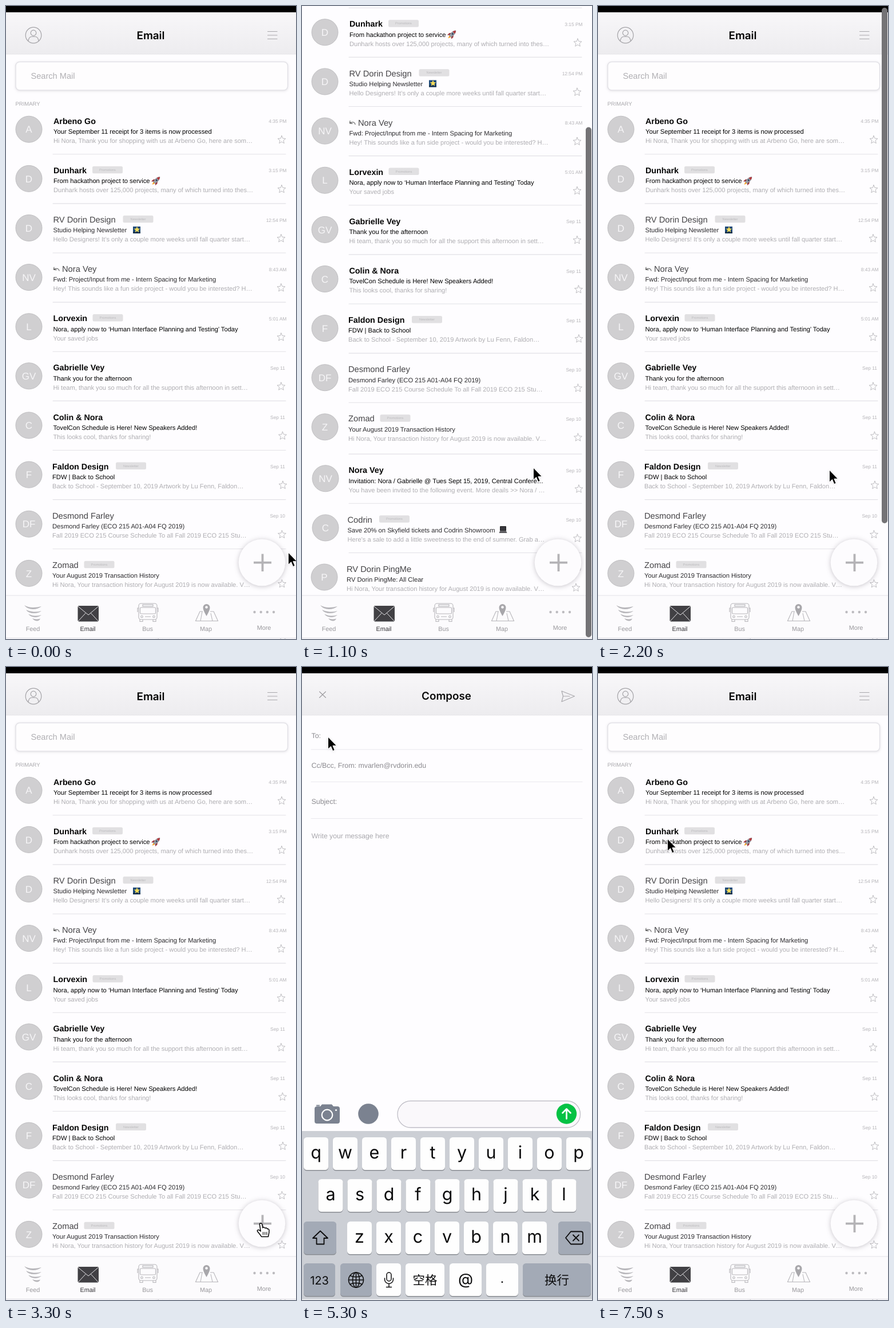
Recreate the animation shown at these times as an HTML page. Size 507 by 1105 pixels, loop 7.6 s.

```html
<!DOCTYPE html>
<html lang="en">
<head>
<meta charset="utf-8">
<title>Mail app prototype</title>
<style>
html, body { margin: 0; width: 100%; height: 100%; overflow: hidden; background: #fdfcfe; }
#stage { display: block; width: 100vw; height: 100vh; font-family: "Liberation Sans", Arial, sans-serif; text-rendering: geometricPrecision; }
.lift { filter: drop-shadow(0 1px 4px rgba(60, 55, 70, .28)); }
.soft { filter: drop-shadow(0 1px 2px rgba(60, 55, 70, .13)); }
.line { fill: none; stroke-linecap: round; stroke-linejoin: round; }
.title { font-family: Inter, sans-serif; font-weight: 600; text-anchor: middle; }
.keys { font-family: Inter, "Noto Sans CJK SC", "Noto Sans CJK", sans-serif; text-anchor: middle; }
</style>
</head>
<body>
<svg id="stage" viewBox="0 0 507 1105" preserveAspectRatio="none"></svg>
<script>
const LOOP = 7600, TICK = 100, H = 1105;
const PITCH = 86.13, MAX_SCROLL = 246;
const OPEN = 3560, CLOSE = 6459, DECAY = 0.00954;

const text = (x, y, s, size, fill, attrs = '') =>
  `<text x="${x}" y="${y}" font-size="${size}" fill="${fill}" ${attrs}>${s}</text>`;
const line = (d, stroke, width = 1, attrs = '') =>
  `<path class="line" d="${d}" stroke="${stroke}" stroke-width="${width}" ${attrs}/>`;
const rect = (x, y, w, h, fill, attrs = '') =>
  `<rect x="${x}" y="${y}" width="${w}" height="${h}" fill="${fill}" ${attrs}/>`;
const circle = (x, y, r, fill, attrs = '') =>
  `<circle cx="${x}" cy="${y}" r="${r}" fill="${fill}" ${attrs}/>`;
const mid = 'text-anchor="middle"', end = 'text-anchor="end"', bold = 'font-weight="700"';

function starPath(x, y, r) {
  let d = '';
  for (let i = 0; i < 10; i++) {
    const a = i * Math.PI / 5 - Math.PI / 2, k = i % 2 ? r * 0.45 : r;
    d += (i ? 'L' : 'M') + (x + k * Math.cos(a)).toFixed(2) + ' ' + (y + k * Math.sin(a)).toFixed(2);
  }
  return d + 'Z';
}

const promo = 'Promotions', news = 'Newsletter';
const rows = [
  { who: 'Arbeno Go', ini: 'A', x: 83, sx: 482, unread: 1, at: '4:35 PM',
    sub: 'Your September 11 receipt for 3 items is now processed',
    pre: 'Hi Nora, Thank you for shopping with us at Arbeno Go, here are som…' },
  { who: 'Dunhark', ini: 'D', x: 83, sx: 482, unread: 1, at: '3:15 PM', tag: promo, tx: 151,
    sub: 'From hackathon project to service', icon: 'rocket',
    pre: 'Dunhark hosts over 125,000 projects, many of which turned into thes…' },
  { who: 'RV Dorin Design', ini: 'D', x: 82.5, sx: 481, at: '12:54 PM', tag: news, tx: 204.5,
    sub: 'Studio Helping Newsletter', icon: 'glow',
    pre: 'Hello Designers! It’s only a couple more weeks until fall quarter start…' },
  { who: 'Nora Vey', ini: 'NV', x: 82.5, sx: 481, at: '8:43 AM', reply: 1,
    sub: 'Fwd: Project/Input from me - Intern Spacing for Marketing',
    pre: 'Hey! This sounds like a fun side project - would you be interested? H…' },
  { who: 'Lorvexin', ini: 'L', x: 82.5, sx: 481, unread: 1, at: '5:01 AM', tag: promo, tx: 151.5,
    sub: 'Nora, apply now to ‘Human Interface Planning and Testing’ Today',
    pre: 'Your saved jobs' },
  { who: 'Gabrielle Vey', ini: 'GV', x: 82.5, sx: 481, unread: 1, at: 'Sep 11',
    sub: 'Thank you for the afternoon',
    pre: 'Hi team, thank you so much for all the support this afternoon in sett…' },
  { who: 'Colin &amp; Nora', ini: 'C', x: 82.5, sx: 483.5, unread: 1, at: 'Sep 11',
    sub: 'TovelCon Schedule is Here! New Speakers Added!',
    pre: 'This looks cool, thanks for sharing!' },
  { who: 'Faldon Design', ini: 'F', x: 81, sx: 484, unread: 1, at: 'Sep 11', tag: news, tx: 192,
    sub: 'FDW | Back to School',
    pre: 'Back to School - September 10, 2019 Artwork by Lu Fenn, Faldon…' },
  { who: 'Desmond Farley', ini: 'DF', x: 81, sx: 482.5, at: 'Sep 10',
    sub: 'Desmond Farley (ECO 215 A01-A04 FQ 2019)',
    pre: 'Fall 2019 ECO 215 Course Schedule To all Fall 2019 ECO 215 Stu…' },
  { who: 'Zomad', ini: 'Z', x: 81, sx: 482.5, at: 'Sep 10', tag: promo, tx: 136.5,
    sub: 'Your August 2019 Transaction History',
    pre: 'Hi Nora, Your transaction history for August 2019 is now available. V…' },
  { who: 'Nora Vey', ini: 'NV', x: 81.5, sx: 484, unread: 1, at: 'Sep 10',
    sub: 'Invitation: Nora / Gabrielle @ Tues Sept 15, 2019, Central Confere…',
    pre: 'You have been invited to the following event. More deails &gt;&gt; Nora / …' },
  { who: 'Codrin', ini: 'C', x: 79.5, sx: 481.5, at: 'Sep 10', tag: promo, tx: 135,
    sub: 'Save 20% on Skyfield tickets and Codrin Showroom', icon: 'laptop',
    pre: 'Here’s a sale to add a little sweetness to the end of summer. Grab a…' },
  { who: 'RV Dorin PingMe', ini: 'P', x: 78, sx: 479, at: 'Sep 9',
    sub: 'RV Dorin PingMe: All Clear',
    pre: 'Hi Nora, Your transaction history for August 2019 is now available. V…' }
];

// Small pictures that follow a subject, placed from the row's name centre.
const pictures = {
  rocket: y => `<g transform="translate(262.5 ${y + 18}) rotate(45)">
    <path d="M-2 4L-5 7V2L-2 -1zM2 4L5 7V2L2 -1z" fill="#a02f36"/>
    <path d="M0 -9Q4 -5 2.5 5H-2.5Q-4 -5 0 -9z" fill="#9a9ea8" stroke="#5d616b" stroke-width=".6"/>
    <path d="M0 -9Q2 -7 2.6 -4H-2.6Q-2 -7 0 -9z" fill="#b5363b"/>
    <circle cy="-1" r="1.5" fill="#31455e"/><path d="M-2 5H2L0 10z" fill="#f5a42c"/></g>`,
  glow: y => rect(222, y + 12, 13, 12, '#1d4a78') + rect(222, y + 21, 13, 3, '#17324f') +
    `<path d="${starPath(229, y + 17.5, 5.6)}" fill="#f6dc58"/>`,
  laptop: y => rect(346, y + 11.5, 11, 8.5, '#242326', 'rx="1"') +
    rect(347.2, y + 12.7, 8.6, 6.2, '#38373c') +
    `<path d="M346 ${y + 20}h11l1.5 3.5h-14z" fill="#5b5a5e"/>`
};

function mailRow(r, i) {
  const y = 200.7 + i * PITCH + (i > 9 ? 3.8 : 0);
  const cx = i === 12 ? 39 : i > 9 ? 41 : 40, cy = y + 14.5;
  const ink = r.unread ? '#050505' : '#444346';
  let s = circle(cx, cy, 23, '#d0cfd1', 'stroke="#bfbec1"') +
    text(cx, cy + 6.2, r.ini, 17, '#f6f5f7', mid);
  if (r.reply) s += line(`M93 ${y + 3}q-1 -6 -9 -2.5M84 ${y - 3}l-.5 4l4.5 .5`, '#555', 1.1);
  s += text(r.x + (r.reply ? 15.5 : 0), y + 5.1, r.who, r.unread ? 14.3 : 14.7, ink, r.unread ? bold : '');
  if (r.tag) s += rect(r.tx, y - 7.2, 53, 12.5, '#e1e0e2', 'rx="2.5"') +
    text(r.tx + 26.5, y + 1, r.tag, 5.7, '#bbbabd', mid);
  s += text(r.x, y + 22.3, r.sub, 11.2, r.unread ? '#000' : '#2b2a2d');
  s += text(r.x, y + 38.3, r.pre, 11.1, '#aeadb1');
  if (r.icon) s += pictures[r.icon](y);
  s += text(i < 5 ? 490.5 : 488, y + 3.6, r.at, 8.4, '#b4b3b7', end);
  s += line(starPath(r.sx, y + 33, 7.3), '#bdbcc0');
  if (i < rows.length - 1)
    s += line(`M82 ${y + 58 + (i === 9 ? 3.8 : 0)}H489`, '#e2e1e6', 1.1);
  return s;
}

const header = rect(0, 0, 507, 84.5, '#e5e4e7') + rect(0, 0, 507, 83.5, 'url(#head)') + rect(0, 0, 507, 11, '#000');

const mailTop = header +
  circle(48, 51, 13.8, 'none', 'stroke="#a5a4a8" stroke-width="1.2"') +
  circle(48, 47, 4.8, 'none', 'stroke="#a5a4a8" stroke-width="1.2"') +
  line('M39 61Q40 53.5 45 53.5H51Q56 53.5 57 61', '#a5a4a8', 1.2) +
  text(253, 57.5, 'Email', 18.8, '#000', 'class="title"') +
  line('M457.5 44.5H474M457.5 51H474M457.5 57.5H474', '#a9a8ac', 1.2) +
  rect(17, 97.5, 475.5, 49.5, '#fefdfe', 'class="soft" rx="7" stroke="#e3e2e7" stroke-width="1.5"') +
  text(43.5, 127, 'Search Mail', 14.6, '#b0afb3') +
  text(16.5, 173.5, 'PRIMARY', 9.5, '#a9a8ac');

const grey = '#b7b6ba';
const tabs = rect(0, 1029, 507, 74.5, '#fcfbfd') +
  line('M0 1029H507M0 1103.3H507', '#e3e2e7', 1.2) +
  `<g fill="${grey}"><path d="M32 1046Q39 1050 47 1050T62 1048Q56 1053 47 1053Q37 1053 32 1046z"/>
   <path d="M35 1054Q41 1057 48 1057.5T62 1056Q57 1060 49 1060Q39 1060 35 1054z"/>
   <path d="M39 1061.5Q45 1064 50 1064.5T62 1063Q57 1067 51 1067Q43 1066.5 39 1061.5z"/>
   <path d="M46 1069Q52 1071.5 60 1069.5Q58 1073.5 54 1073.5Q49 1073 46 1069z"/></g>` +
  rect(125.5, 1047, 36.5, 27.5, '#414044', 'rx="2"') +
  line('M126.5 1048.5L144 1063L161 1048.5M126.5 1073.5L139 1060M161 1073.5L148.5 1060', '#e9e8eb', 1) +
  `<g fill="none" stroke="${grey}" stroke-width="1.1">` +
  rect(232, 1043, 32, 28, 'none', 'rx="4"') + rect(234.5, 1050, 27, 11, 'none', 'rx="1.5"') +
  rect(239, 1045, 18, 3, 'none') +
  circle(237.5, 1066, 1.8, 'none') + circle(258.5, 1066, 1.8, 'none') +
  `<path d="M234 1071v3.5h5v-3.5M257 1071v3.5h5v-3.5M232 1051h-2v7M264 1051h2v7M243 1066h10"/>
   <path d="M344 1057H339L331.5 1073.5H370.5L363 1057H357M343 1057L340 1073.5M358 1060L361 1073.5"/></g>` +
  `<path d="M350.5 1065Q344.5 1055 344.5 1050a6 6 0 0 1 12 0Q356.5 1055 350.5 1065z" fill="#a8a7ab"/>` +
  circle(350.5, 1049.5, 2.3, '#fcfbfd') +
  [434.5, 445.7, 456.8, 468].map(x => circle(x, 1058, 2.2, '#bcbbbf')).join('') +
  [['Feed', 47], ['Email', 143], ['Bus', 247.5], ['Map', 349.5], ['More', 451]].map(([s, x]) =>
    text(x, s === 'More' ? 1088.5 : 1091.3, s, 10.8, s === 'Email' ? '#333236' : '#98979b', mid)).join('');

const plus = circle(447.5, 971.5, 40.8, '#fdfcfe', 'class="lift"') +
  line('M433 971.7H464M448.5 956.5V987', '#b4b3b6', 3.8, 'style="stroke-linecap:butt"');

const mail = rect(0, 0, 507, H, '#fefdff') +
  `<g id="list">${mailTop}${rows.map(mailRow).join('')}</g>${tabs}${plus}` +
  rect(496, 3, 10, 900, '#747376', 'id="thumb" rx="5"');

function key(x, y, w, label = '', dark = false, size = 30.5, drop = 36.5) {
  return rect(x, y + 1.5, w, 57, '#898c92', 'rx="5.5"') +
    rect(x, y, w, 57, dark ? '#a3aab6' : '#fefefe', 'rx="5.5"') +
    text(x + w / 2, y + drop, label, size, '#0b0b0c');
}
const keyRow = (letters, x, y) => [...letters].map((c, i) => key(x + i * 51, y, 43, c)).join('');

const keyboard = rect(0, 810, 507, 295, '#cccfd5') + rect(0, 1103.5, 507, 2, '#f1f1f4') +
  `<g class="keys">` + keyRow('qwertyuiop', 3, 821) + keyRow('asdfghjkl', 28.5, 894) +
  keyRow('zxcvbnm', 79, 968) + key(3, 968, 57, '', true) + key(448, 968, 57, '', true) +
  key(3, 1041, 55, '123', true, 20) + key(67, 1041, 55, '', true) + key(130, 1041, 43) +
  key(181, 1041, 68, '空格', false, 21.5, 37) + key(258, 1041, 56, '@', false, 27, 36.5) +
  key(322, 1041, 56, '.', false, 22, 34) + key(386, 1041, 119, '换行', true, 21.5, 37) + '</g>' +
  line('M32 984.5L45 997H38.5V1007.5H25.5V997H19z', '#0b0b0c', 1.8) +
  line('M470 985.5H488Q491 985.5 491 988.5V1004.5Q491 1007.5 488 1007.5H470L461 996.5zM474 991.5L484 1001.5M484 991.5L474 1001.5', '#0b0b0c', 1.8) +
  `<g class="line" stroke="#0b0b0c" stroke-width="1.5">` + circle(94.5, 1070, 13, 'none') +
  `<ellipse cx="94.5" cy="1070" rx="6" ry="13"/><path d="M81.5 1070h26M94.5 1057v26M84 1062.5Q94.5 1067 105 1062.5M84 1077.5Q94.5 1073 105 1077.5"/>` +
  rect(148, 1057, 8, 15, 'none', 'rx="4"') +
  `<path d="M144.5 1067v2a7.5 7.5 0 0 0 15 0v-2M152 1077v5.5M147.5 1082.5h9"/></g>`;

const slate = '#7b8290';
const composer = `<path d="M27 767H32L35 763.5H52L55 767H62Q66 767 66 771V793Q66 797 62 797H26Q22 797 22 793V771Q22 767 27 767z" fill="${slate}"/>` +
  rect(25, 764.5, 6, 2, slate) +
  circle(44, 782, 9.3, slate, 'stroke="#fff" stroke-width="2.2"') + circle(59.5, 773.5, 1.6, '#fff') +
  circle(116, 780, 17.8, slate) +
  rect(167, 757.5, 319.5, 46.5, '#faf8fb', 'rx="23" stroke="#c0bfc7" stroke-width="1.3"') +
  circle(462.5, 780, 17.7, '#05c244') +
  line('M462.5 788.5V772M455.5 778.5L462.5 771.5L469.5 778.5', '#fff', 2.8);

const label = '#8b8a8f';
const compose = rect(0, 0, 507, H, '#fefdff') + header +
  line('M30.5 43L41.5 53.5M41.5 43L30.5 53.5', '#9b9a9e', 1.1) +
  text(252.5, 56.5, 'Compose', 18.8, '#0a0a0a', 'class="title"') +
  line('M454 42L476.5 51L454 60.5L456.5 51zM456.5 51H468', '#a9a8ac', 1.2) +
  line('M16 144H490M16 200.5H490M16 264.5H490', '#e9e8ed', 1.2) +
  text(16.5, 124, 'To:', 12.3, label) +
  text(16.5, 176, 'Cc/Bcc, From: mvarlen@rvdorin.edu', 12.4, label) +
  text(16.5, 239, 'Subject:', 12.4, label) +
  text(16.5, 299, 'Write your message here', 12.2, '#a9a8ad') +
  composer + keyboard;

const pointer = `<g id="pointer"><path id="arrow" class="soft" d="M-.5 0V21.2L4.5 16.6L7.8 24.6L11.2 23.2L7.9 15.4H14.5z" fill="#000" stroke="#fff"/>
  <g id="hand" class="line" stroke="#000" stroke-width="1.5">
  <path fill="#fff" d="M-2.6 2.2C-2.9 -.6 1 -.9 1.6 1.6L3 8C3.6 6.6 6.6 6.8 7 8.8C8 7.6 10.6 8.2 10.8 10C12 9.4 13.8 10.2 14 12C14.4 16 13.4 19 12.4 23.5H.6C-1.4 20 -4 17 -6.4 14.2C-7.6 12.4 -5 10.4 -3 12.2L-.8 14z"/>
  <path d="M3.5 15.5v4.5M6.7 15.5v4.5M9.9 15.5v4.5" stroke-width="1.1"/></g></g>`;

const stage = document.getElementById('stage');
stage.innerHTML = `<defs><linearGradient id="head" x2="0" y2="1">
  <stop offset=".13" stop-color="#f8f7f9"/><stop offset="1" stop-color="#edecef"/></linearGradient></defs>
  <g id="mail"><svg width="507" height="${H}">${mail}</svg></g><g id="compose">${compose}</g>${pointer}`;
const part = Object.fromEntries(['mail', 'compose', 'list', 'thumb', 'pointer', 'arrow', 'hand']
  .map(id => [id, document.getElementById(id)]));

// Each key: time, then values.
const scrollKeys = [[600, 0], [700, 10], [800, 70], [900, 160], [1000, 230], [1100, 255.5],
  [1200, 251], [1300, 248], [1500, 246], [1800, 246], [1900, 205], [2000, 105], [2100, 25], [2200, 0]];
const pointerKeys = [[0, 494, 954], [100, 468, 912], [200, 422, 834], [300, 405, 806], [1400, 405, 806],
  [1500, 405, 810], [2600, 405, 810], [2900, 425, 880], [3300, 446, 971], [4300, 446, 971], [4700, 360, 780],
  [5100, 150, 424], [5300, 46, 122], [5900, 35, 52], [6100, 34, 48], [7200, 34, 48], [7300, 50, 100], [7400, 98, 230], [7500, 122, 300]];
const fadeKeys = [[2600, 1], [2900, 0]];

function track(keys, t) {
  const n = keys.findIndex(k => k[0] > t);
  if (n === 0) return keys[0].slice(1);
  if (n < 0) return keys[keys.length - 1].slice(1);
  const a = keys[n - 1], b = keys[n], p = (t - a[0]) / (b[0] - a[0]);
  return a.slice(1).map((v, i) => v + (b[i + 1] - v) * p);
}
const slide = (t, start) => {
  const d = t < start ? H : H * Math.exp(-DECAY * (t - start));
  return d < 0.5 ? 0 : d;
};
const move = (el, x, y) => el.setAttribute('transform', `translate(${x.toFixed(2)} ${y.toFixed(2)})`);

function draw(t) {
  const [scroll] = track(scrollKeys, t), over = Math.max(0, scroll - MAX_SCROLL);
  move(part.list, 0, -scroll);
  part.thumb.setAttribute('y', 3 + Math.min(scroll, MAX_SCROLL) / MAX_SCROLL * 199 + over);
  part.thumb.setAttribute('height', 900 - over);
  part.thumb.setAttribute('opacity', t < 700 ? 0 : track(fadeKeys, t)[0]);

  const closing = t >= CLOSE;
  move(part.mail, 0, closing ? -slide(t, CLOSE) : 0);
  move(part.compose, 0, closing ? 0 : slide(t, OPEN));
  stage.insertBefore(closing ? part.mail : part.compose, part.pointer);

  const hand = (t >= 3100 && t < 4400) || (t >= 5800 && t < 7300);
  move(part.pointer, ...track(pointerKeys, t));
  part.hand.setAttribute('visibility', hand ? 'visible' : 'hidden');
  part.arrow.setAttribute('visibility', hand ? 'hidden' : 'visible');
}

const begin = performance.now();
let last = -1;
function frame() {
  const t = Math.floor((performance.now() - begin) % LOOP / TICK) * TICK;
  if (t !== last) draw(last = t);
  requestAnimationFrame(frame);
}
frame();
</script>
</body>
</html>
```
